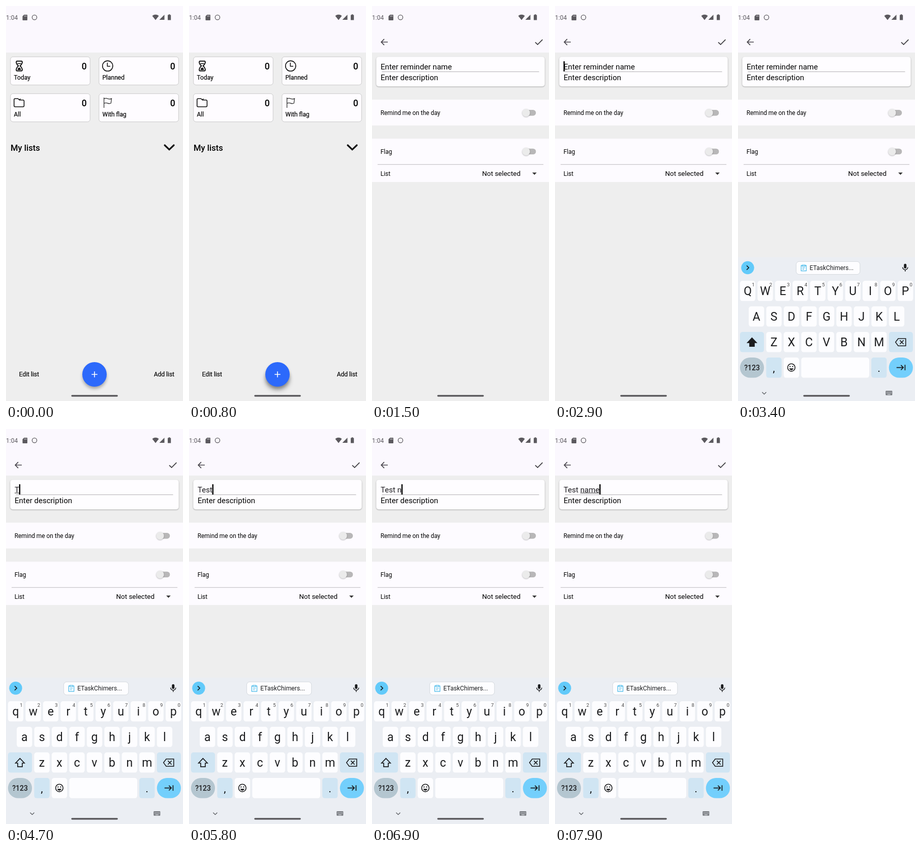
An HTML page that plays this animation: 348 by 772 pixels, repeating every 8 s.

```html
<!DOCTYPE html>
<html lang="en">
<head>
<meta charset="utf-8">
<title>Reminder form</title>
<style>
html, body { margin: 0; width: 100%; height: 100%; overflow: hidden; background: #eee; }
svg { display: block; width: 348px; height: 772px; }
text { font-family: Roboto, sans-serif; white-space: pre; }
</style>
</head>
<body>
<svg id="stage" viewBox="0 0 348 772" xmlns="http://www.w3.org/2000/svg"></svg>
<script>
const LOOP = 8000;
const NAME_X = 17, NAME_SIZE = 15.1;
const stage = document.getElementById('stage');
const $ = id => document.getElementById(id);

const text = (x, y, size, str, attrs = '') =>
  `<text x="${x}" y="${y}" font-size="${size}" ${attrs}>${str}</text>`;
const box = (x, y, w, h, r, fill, attrs = '') =>
  `<rect x="${x}" y="${y}" width="${w}" height="${h}" rx="${r}" fill="${fill}" ${attrs}/>`;
const line = (d, width, color = '#111', attrs = '') =>
  `<path d="${d}" fill="none" stroke="${color}" stroke-width="${width}" ${attrs}/>`;
const dot = (x, y, r, fill, attrs = '') =>
  `<circle cx="${x}" cy="${y}" r="${r}" fill="${fill}" ${attrs}/>`;
const shape = (d, fill) => `<path d="${d}" fill="${fill}"/>`;

const BOLD = 'font-weight="500"';
const MID = 'text-anchor="middle"';
const END = 'text-anchor="end"';
const ROUND = 'stroke-linecap="round" stroke-linejoin="round"';

function statusBar() {
  const c = '#5b595e';
  return box(0, 0, 348, 91, 0, '#fbf8fe') +
    text(0, 27, 12, '1:04', `fill="${c}"`) +
    shape('M35.5 17H41a1 1 0 0 1 1 1V27a1 1 0 0 1-1 1H33.5a1 1 0 0 1-1-1V20Z', c) +
    line('M36.4 18.6v2M38.2 18.6v2M40 18.6v2', .8, '#fbf8fe') +
    dot(56, 22.3, 4.6, 'none', `stroke="${c}" stroke-width="1.3"`) +
    shape('M287.5 19.2Q294 14.4 300.5 19.2L294 27.5Z', c) +
    shape('M311.5 17V27H301.5Z', c) +
    shape('M319.8 16.2h2.6v1.2h1.8V27.6h-6.2V17.4h1.8Z', c);
}

function homeCard(x, y, label, icon) {
  return box(x, y, 156.5, 55, 5, '#fefcff', 'stroke="#cacaca"') +
    text(x + 150, y + 24.5, 17.5, '0', `${BOLD} ${END}`) +
    text(x + 6.7, y + 45, 12, label, 'stroke="#000" stroke-width=".2"') + icon;
}

function home() {
  const hourglass =
    line('M21.5 107.7H30.5Q32.5 108 31.7 111.5Q31 114 27.7 117Q31 120 31.7 123Q32.5 126.5 30.5 126.8H21.5Q19.7 126.5 20.4 123Q21 120 24.4 117Q21 114 20.4 111.5Q19.7 108 21.5 107.7Z', 2) +
    line('M22.5 112.5H29.6', 1.6) + shape('M22.8 125Q23 121 26 120.3Q29.2 121 29.3 125Z', '#111');
  const clock = dot(199.8, 117.2, 10.1, 'none', 'stroke="#111" stroke-width="1.6"') +
    line('M199.3 110.7V117.7H205', 1.5);
  const folder = line('M18 181H23.5L26.3 183.8H33.3Q35.5 183.8 35.5 186V194.8Q35.5 197 33.3 197H18Q15.8 197 15.8 194.8V183.2Q15.8 181 18 181ZM26.3 183.8L28.5 181.2', 1.6);
  const flag = line('M192.6 179V199M192.6 181.2Q197 179.4 200 181.2Q203.5 182.8 207.5 180.8L206.3 190Q202.5 191.5 199.5 189.9Q196.5 188.6 192.6 190.2', 1.3, '#333');
  return homeCard(8.8, 99.3, 'Today', hourglass) +
    homeCard(182.8, 99.3, 'Planned', clock) +
    homeCard(8.8, 171.3, 'All', folder) +
    homeCard(182.8, 171.3, 'With flag', flag) +
    text(9, 282.5, 16.6, 'My lists', BOLD) +
    line('M312 272L321 280.7L330 272', 3.2, '#111', ROUND) +
    text(25.7, 724.3, 12, 'Edit list', 'stroke="#000" stroke-width=".2"') +
    text(331, 724.3, 12, 'Add list', `${END} stroke="#000" stroke-width=".2"`) +
    `<ellipse id="lift" cx="174" cy="731" rx="25" ry="21" fill="#000" opacity="0" filter="url(#blurBig)"/>` +
    dot(174, 724.5, 23.5, '#000', 'opacity=".32" filter="url(#blur)"') +
    dot(174, 720, 24, '#2c69fb') +
    dot(174, 720, 24, '#fff', 'id="ripple" opacity="0"') +
    line('M174 714.3V725.7M168.3 720H179.7', 1.6, '#fff');
}

function toggle(y) {
  return box(298, y - 5.7, 24.3, 11.4, 5.7, '#b8b7b8') +
    dot(303, y + .8, 7.8, '#000', 'opacity=".25" filter="url(#soft)"') +
    dot(303, y, 7.6, '#ebebeb');
}

function form() {
  return line('M31 70.5H18.5M24 64.7L18.2 70.5L24 76.3', 1.7, '#48454c') +
    line('M321 70.8L325.6 75.4L335.3 65.6', 1.7, '#3d3b40') +
    box(8.3, 100.3, 331.4, 57.6, 5, '#000', 'opacity=".35" filter="url(#soft)"') +
    box(8.3, 99.2, 331.4, 58, 5, '#fefdff') +
    line('M19.5 128.5H328.5', 1, '#b3b1b4') +
    text(NAME_X, 124, NAME_SIZE, '', 'id="name"') +
    box(NAME_X, 124.6, 0, 1, 0, '#333', 'id="mark"') +
    box(0, 108, 2.4, 20, 0, '#000', 'id="caret"') +
    text(17, 145, 15, 'Enter description') +
    box(0, 183, 348, 50.5, 0, '#fdfbff') +
    text(16.7, 213, 11.9, 'Remind me on the day') + toggle(208.7) +
    box(0, 259.3, 348, 84.7, 0, '#fdfbff') +
    text(16.7, 288.8, 12, 'Flag') + toggle(284.4) +
    line('M11 309.8H337', 1.1, '#bbb9bc') +
    text(16.7, 331.8, 12, 'List') +
    text(292, 332.3, 13.45, 'Not selected', END) +
    shape('M315 325.4H323.8L319.4 329.9Z', '#333');
}

const PITCH = 34.45, KEY_W = 30.3, KEY_H = 39.6;
const ROWS = [['qwertyuiop', 3.9, 532], ['asdfghjkl', 21.1, 582], ['zxcvbnm', 55.4, 632]];

function letterRow([letters, x0, y]) {
  return [...letters].map((ch, i) => {
    const x = x0 + i * PITCH;
    const digit = y === 532
      ? text(x + KEY_W - 1.5, y + 11, 9.5, (i + 1) % 10, `${END} fill="#444"`) : '';
    return box(x, y, KEY_W, KEY_H, 5, '#fdfdff') +
      text(x + KEY_W / 2, y + 28, 23, ch, `class="key" ${MID} fill="#1b1c1e"`) + digit;
  }).join('');
}

function keyboard() {
  const pale = '#d0e5f3', cyan = '#73cffc', ink = '#1b1c1e';
  const chip = `<g id="chip">` +
    box(113.4, 494.2, 127.4, 25.6, 6, '#fdfdff', 'stroke="#d5d9de"') +
    line('M125 502H123.3V512.8H133.6V502H132M125.5 503.5V501.2H131.5V503.5ZM125.8 506.5H131M125.8 509.5H129.5', 1.2, '#45b9e9') +
    text(140.3, 511.3, 12.2, 'ETaskChimers...', `fill="${ink}"`) + '</g>';
  return box(0, 486, 348, 386, 0, '#ebeef3') +
    dot(19, 506.5, 12.7, '#62cafa') +
    line('M17 502.3L21.2 506.5L17 510.7', 1.7, ink) + chip +
    box(326.2, 498.8, 5, 9.3, 2.5, ink) +
    line('M323.6 505.5a5.1 5.1 0 0 0 10.2 0M328.7 510.5V514', 1.4, ink) +
    ROWS.map(letterRow).join('') +
    box(3.9, 632, 47.2, KEY_H, 5, pale) +
    line('M27.5 643.8L36.2 653H32V660.2H23V653H18.8Z', 1.7, ink, 'id="shift"') +
    box(296.7, 632, 47.2, KEY_H, 5, pale) +
    line('M315 645H329.7V659.3H315L309.7 652.1ZM318.3 648.4L325.6 655.8M325.6 648.4L318.3 655.8', 1.6, ink) +
    box(3.9, 682, 47.2, KEY_H, 19.8, '#b4c6d0') +
    text(27.5, 706.8, 14, '?123', `${BOLD} ${MID} fill="${ink}"`) +
    box(55.4, 682, KEY_W, KEY_H, 5, pale) + text(70.5, 710, 20, ',', MID) +
    box(89.8, 682, KEY_W, KEY_H, 5, '#fdfdff') +
    dot(104.9, 701.6, 7.3, 'none', `stroke="${ink}" stroke-width="1.6"`) +
    dot(102.3, 699.6, 1.2, ink) + dot(107.5, 699.6, 1.2, ink) +
    shape('M100.7 703.3H109.1Q107.8 706.7 104.9 706.7Q102 706.7 100.7 703.3Z', ink) +
    box(124.3, 682, 133.7, KEY_H, 5, '#fdfdff') +
    box(262.1, 682, KEY_W, KEY_H, 5, pale) + text(277.2, 710, 20, '.', MID) +
    box(296.7, 682, 47.2, KEY_H, 19.8, cyan) +
    line('M311.7 701.6H325M320.3 696.8L325.1 701.6L320.3 706.4M328.4 696.3V706.9', 1.7, ink) +
    line('M47.5 749.8L51.5 753.6L55.5 749.8', 1.3, '#55585c') +
    box(290.3, 747, 13, 8.8, 1, '#777a7f') +
    line('M292 749.5H302M292 751.7H302', 1.1, '#ebeef3', 'stroke-dasharray="1.2 1"') +
    line('M293.8 754H299.8', 1, '#ebeef3');
}

const blur = (id, dev) =>
  `<filter id="${id}" x="-50%" y="-50%" width="200%" height="200%"><feGaussianBlur stdDeviation="${dev}"/></filter>`;

stage.innerHTML = `<defs>${blur('soft', 1.3)}${blur('blur', 3)}${blur('blurBig', 4)}</defs>` +
  box(0, 0, 348, 772, 0, '#eee') + statusBar() +
  `<g id="home">${home()}</g><g id="form">${form()}</g><g id="board">${keyboard()}</g>` +
  box(128.3, 760.2, 91.6, 3.2, 1.6, '#565558');

const ruler = document.createElement('canvas').getContext('2d');
const widthOf = str => {
  ruler.font = `${NAME_SIZE}px Roboto, sans-serif`;
  return ruler.measureText(str).width;
};

// [time, typed text, start of the underlined word or -1]
const TYPING = [
  [0, '', -1], [4600, 'T', -1], [4700, 'T', 0], [5100, 'Te', -1], [5400, 'Te', 0],
  [5600, 'Tes', -1], [5700, 'Tes', 0], [5800, 'Test', -1], [5900, 'Test', 0],
  [6700, 'Test ', -1], [6900, 'Test n', -1], [7100, 'Test na', -1], [7200, 'Test na', 5],
  [7400, 'Test nam', -1], [7500, 'Test nam', 5], [7700, 'Test name', -1], [7900, 'Test name', 5]
];
const CARET_ON = [[2900, 3400], [3900, 4400], [4600, 6400], [6700, LOOP]];

const show = (id, on) => $(id).setAttribute('visibility', on ? 'visible' : 'hidden');
const set = (id, attrs) => {
  for (const k in attrs) $(id).setAttribute(k, attrs[k]);
};

function draw(t) {
  const onForm = t >= 1400;
  show('home', !onForm);
  show('form', onForm);
  set('ripple', { opacity: t >= 400 && t < 600 ? (t < 500 ? .07 : .1) : 0 });
  set('lift', { opacity: t >= 800 ? .2 : 0 });

  const [, typed, from] = TYPING.filter(s => s[0] <= t).pop();
  $('name').textContent = typed || 'Enter reminder name';
  $('name').setAttribute('fill', typed ? '#1d1b20' : '#000');
  const end = widthOf(typed);
  const start = from < 0 ? end : widthOf(typed.slice(0, from));
  set('mark', { x: NAME_X + start, width: end - start });
  set('caret', { x: NAME_X - .3 + end });
  show('caret', CARET_ON.some(([a, b]) => t >= a && t < b));

  // The keyboard decelerates upward in 100 ms steps.
  const step = Math.floor((t - 3300) / 100);
  const drop = step > 2 ? 0 : 90 * Math.exp(-2.89 * step);
  const caps = t < 4600;
  show('board', step >= 0);
  if (step < 0) return;
  const zoom = 1 - Math.min(drop, 10) * .003;
  set('board', { transform: `translate(0 ${drop})` });
  set('chip', { transform: `translate(177.1 507) scale(${zoom}) translate(-177.1 -507)` });
  set('shift', { fill: caps ? '#1b1c1e' : 'none' });
  for (const key of stage.querySelectorAll('.key')) {
    const ch = key.textContent;
    key.textContent = caps ? ch.toUpperCase() : ch.toLowerCase();
  }
}

const began = performance.now();
function tick() {
  draw((performance.now() - began) % LOOP);
  requestAnimationFrame(tick);
}
tick();
</script>
</body>
</html>
```
